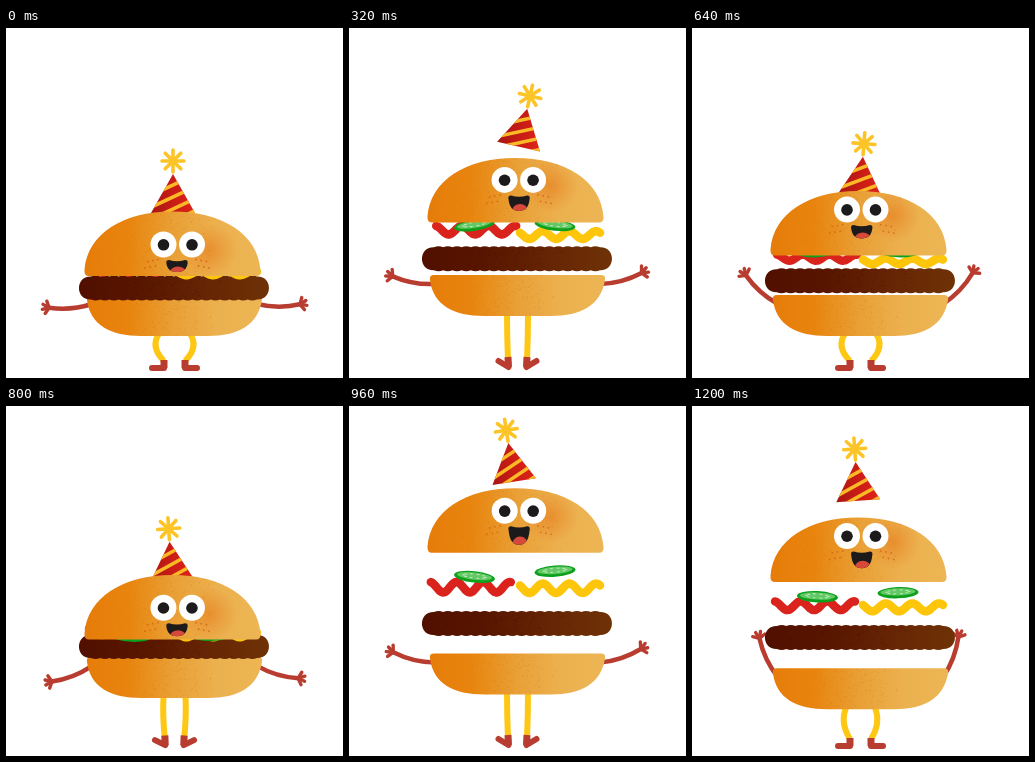
Write an HTML page with a canvas that moves like this. It is 337x350 px and loops after 1280 ms.

```html
<!DOCTYPE html>
<html lang="en">
<head>
<meta charset="utf-8">
<title>Jumping party burger</title>
<style>
html, body { margin: 0; width: 100%; height: 100%; overflow: hidden; background: #fff; }
canvas { display: block; width: 337px; height: 350px; }
</style>
</head>
<body>
<canvas id="stage"></canvas>
<script>
const W = 337, H = 350, STEP = 80, COUNT = 16;
const canvas = document.getElementById('stage');
const c = canvas.getContext('2d');
const scale = window.devicePixelRatio || 1;
canvas.width = Math.round(W * scale);
canvas.height = Math.round(H * scale);

const RED = '#b83d30', YELLOW = '#fdc714', DARK = '#1d1a1b';
const BUN = ramp(79, 256, '#e67c09', '#e8850f', '#e9a036', '#ecb14f', '#edb554');
const MEAT = ramp(73, 263, '#510f00', '#581600', '#662504', '#6f3206');

// Two hops per loop, a small and a big one, as [take-off, landing] steps.
const beat = {
  base:  [[0, 8], [8.5, 15.3]],
  patty: [[.7, 8.5], [9.4, 16]],
  sauce: [[1.1, 8.6], [9.7, 16]],
  bun:   [[.9, 8.8], [9.85, 16]],
  hat:   [[1.5, 8.45], [9.9, 16.3]]
};

// How far a layer is off the ground; the big hop hangs longer at the top.
function lift(i, hops, small, big) {
  const arc = ([from, to], power) => {
    const u = (i - from) / (to - from);
    return u > 0 && u < 1 ? 1 - Math.abs(2 * u - 1) ** power : 0;
  };
  return small * arc(hops[0], 2) + big * arc(hops[1], 3);
}

function smooth(a, b, x) {
  const u = Math.min(1, Math.max(0, (x - a) / (b - a)));
  return u * u * (3 - 2 * u);
}

function poseAt(i) {
  const big = i >= 9;
  const u = big ? (i - 9) / 7 : i / 9;
  const sway = (big ? -9 : 13) * Math.sin(Math.PI * u);
  const swing = Math.sin(2 * Math.PI * (.1 + .85 * u));
  const look = smooth(.1, .6, u);
  const bunLift = lift(i, beat.bun, 56, 104);
  const sauceLift = lift(i, beat.sauce, 42, 62);
  const base = 267 - lift(i, beat.base, 20, 19.5);
  return {
    sway, base,
    bun: 248 - bunLift,
    patty: 260 - lift(i, beat.patty, 30, 43),
    ketchup: 242 - sauceLift,
    mustard: 245 - lift(i, beat.sauce, 40, 64),
    pickleL: 240 - lift(i, beat.bun, 45, 71),
    pickleR: 240 - lift(i, beat.bun, 45, 77),
    hat: 185 - lift(i, beat.hat, 72, 114),
    wave: 2.5 + sauceLift * .045,
    face: 32.5 - 14.5 * look,
    faceX: -2.5 * look,
    mouth: 12 + bunLift * .065,
    arm: (big ? 24 - 46 * swing : 15 - 34 * swing) * Math.PI / 180,
    crouch: Math.max(0, base - 249)
  };
}

function ramp(x0, x1, ...colors) {
  const g = c.createLinearGradient(x0, 0, x1, 0);
  colors.forEach((color, i) => g.addColorStop(i / (colors.length - 1), color));
  return g;
}

function line(pts, width, color, cap = 'round') {
  c.beginPath();
  pts.forEach(p => c.lineTo(p[0], p[1]));
  c.lineWidth = width;
  c.strokeStyle = color;
  c.lineCap = cap;
  c.lineJoin = 'round';
  c.stroke();
}

function bend(a, m, b, width, color, cap = 'round') {
  c.beginPath();
  c.moveTo(...a);
  c.quadraticCurveTo(...m, ...b);
  c.lineWidth = width;
  c.strokeStyle = color;
  c.lineCap = cap;
  c.stroke();
}

function oval(x, y, rx, ry, color) {
  c.beginPath();
  c.ellipse(x, y, rx, ry, 0, 0, 7);
  c.fillStyle = color;
  c.fill();
}

function grain(seed, n, x, y, w, h, color) {
  let s = seed;
  const rnd = () => (s = s * 16807 % 2147483647) / 2147483647;
  c.fillStyle = color;
  for (let i = 0; i < n; i++) c.fillRect(x + (rnd() + rnd()) / 2 * w, y + rnd() * h, .9, .9);
}

function mirrored(draw) {
  c.save();
  c.translate(W, 0);
  c.scale(-1, 1);
  draw();
  c.restore();
}

function leg(p) {
  const flat = Math.min(1, p.crouch / 12);
  const ankle = 159 - flat, hipY = p.base + 38;
  bend([158 - p.crouch * .25, hipY], [158 - p.crouch * .8, (hipY + 332) / 2], [ankle, 333], 6, YELLOW, 'butt');
  const heel = [159.5 - 1.5 * flat, 339 + flat];
  line([[ankle, 329 + 3 * flat], heel], 7, RED, 'butt');
  line([heel, [149.5 - 3.5 * flat, 333 + 7 * flat]], 6, RED);
}

function arm(y, angle) {
  const x = 86, reach = 43;
  const hx = x - reach * Math.cos(angle), hy = y - reach * Math.sin(angle);
  const mx = (x + hx) / 2 - 5 * Math.sin(angle), my = (y + hy) / 2 + 5 * Math.cos(angle);
  bend([x, y], [mx, my], [hx, hy], 4.5, RED);
  const a = Math.atan2(hy - my, hx - mx);
  for (let f = -1.1; f < 1.2; f += .73) {
    line([[hx, hy], [hx + 7 * Math.cos(a + f), hy + 7 * Math.sin(a + f)]], 3.4, RED);
  }
}

function lowerBun(y) {
  c.save();
  c.beginPath();
  c.moveTo(85, y);
  c.lineTo(252, y);
  c.quadraticCurveTo(257, y, 256, y + 5);
  c.bezierCurveTo(252, y + 30, 232, y + 41, 202, y + 41);
  c.lineTo(135, y + 41);
  c.bezierCurveTo(105, y + 41, 84, y + 30, 81, y + 5);
  c.quadraticCurveTo(80, y, 85, y);
  c.fillStyle = BUN;
  c.fill();
  c.clip();
  grain(71, 150, 105, y, 110, 41, 'rgba(200,110,15,.3)');
  c.restore();
}

function patty(y) {
  const n = 18, x0 = 85, step = 166 / n;
  c.save();
  c.beginPath();
  c.moveTo(x0, y - 11.5);
  for (let i = 0; i < n; i++) c.quadraticCurveTo(x0 + (i + .5) * step, y - 13.5, x0 + (i + 1) * step, y - 11.5);
  c.bezierCurveTo(267, y - 12, 267, y + 12, 251, y + 11.5);
  for (let i = n - 1; i >= 0; i--) c.quadraticCurveTo(x0 + (i + .5) * step, y + 13.5, x0 + i * step, y + 11.5);
  c.bezierCurveTo(69, y + 12, 69, y - 12, x0, y - 11.5);
  c.fillStyle = MEAT;
  c.fill();
  c.clip();
  grain(29, 110, 90, y - 12, 150, 24, 'rgba(60,14,0,.4)');
  c.restore();
}

function sauce(x, y, amp, shift, color) {
  const pts = [];
  for (let u = 0; u <= 1; u += 1 / 64) {
    pts.push([x + u * 80, y - amp * Math.sin(u * 6 * Math.PI + shift)]);
  }
  line(pts, 8.5, color);
}

function pickle(x, y, deg) {
  c.save();
  c.translate(x, y);
  c.rotate(deg * Math.PI / 180);
  oval(0, 0, 20.5, 5.7, '#0da01d');
  oval(0, -.8, 17.5, 3.6, '#62c966');
  for (let a = 0; a < 6.2; a += Math.PI / 5) {
    oval(11 * Math.cos(a), -.8 + 2 * Math.sin(a), 1.7, .6, '#b9e8ae');
  }
  c.restore();
}

function hat(p) {
  c.save();
  c.translate(167 + p.sway * .2, p.hat);
  c.rotate(p.sway * Math.PI / 180);
  c.save();
  c.beginPath();
  c.moveTo(-22, 0);
  c.lineTo(0, -39);
  c.lineTo(22, 0);
  c.closePath();
  c.fillStyle = ramp(-22, 22, '#a81613', '#c91c16', '#df2419');
  c.fill();
  c.clip();
  for (let y = -28; y < 10; y += 12) line([[-30, y + 14], [30, y - 14]], 3.5, '#fbb926');
  c.restore();
  for (let a = 0; a < 3; a += Math.PI / 4) {
    const dx = 11 * Math.cos(a), dy = 11 * Math.sin(a);
    line([[-dx, -52 - dy], [dx, -52 + dy]], 3.6, '#fcc426');
  }
  c.restore();
}

function blush(x, y, r) {
  const g = c.createRadialGradient(x, y, 0, x, y, r);
  g.addColorStop(0, 'rgba(229,112,20,.5)');
  g.addColorStop(1, 'rgba(229,112,20,0)');
  c.fillStyle = g;
  c.fillRect(x - r, y - r, 2 * r, 2 * r);
}

function freckles(x, y) {
  for (let k = 0; k < 6; k++) {
    const row = k % 2, dx = 19 + 2.6 * k, dy = row * 6 + k * .5;
    for (const side of [-1, 1]) oval(x + side * dx, y + dy, .9, .9, 'rgba(211,91,22,.75)');
  }
}

function mouth(x, y, h) {
  c.save();
  c.beginPath();
  c.moveTo(x - 8, y);
  c.quadraticCurveTo(x, y + 2.5, x + 8, y);
  c.quadraticCurveTo(x + 11.5, y, x + 10.5, y + 4);
  c.bezierCurveTo(x + 9.5, y + h * .8, x + 6, y + h, x, y + h);
  c.bezierCurveTo(x - 6, y + h, x - 9.5, y + h * .8, x - 10.5, y + 4);
  c.quadraticCurveTo(x - 11.5, y, x - 8, y);
  c.fillStyle = DARK;
  c.fill();
  c.clip();
  oval(x + 1, y + h, 8, h * .45, '#d5483a');
  c.restore();
}

function topBun(p) {
  const y = p.bun, eyeY = y - 64 + p.face, mouthX = 171 + p.faceX * .5;
  c.save();
  c.beginPath();
  c.moveTo(83, y);
  c.quadraticCurveTo(78, y, 78.5, y - 6);
  c.bezierCurveTo(81, y - 42, 117, y - 64.5, 166, y - 64.5);
  c.bezierCurveTo(216, y - 64.5, 252, y - 42, 254.5, y - 6);
  c.quadraticCurveTo(255, y, 250, y);
  c.closePath();
  c.fillStyle = BUN;
  c.fill();
  c.clip();
  grain(43, 210, 95, y - 64, 125, 64, 'rgba(202,112,18,.3)');
  blush(204 + p.faceX, eyeY + 6, 27);
  freckles(mouthX, eyeY + 15);
  c.restore();
  for (const x of [157.5, 186]) {
    oval(x + p.faceX, eyeY, 13, 13, '#fff');
    oval(x + p.faceX, eyeY + .3, 5.8, 5.8, DARK);
  }
  mouth(mouthX, eyeY + 15.5, p.mouth);
}

function draw(p) {
  c.setTransform(scale, 0, 0, scale, 0, 0);
  c.fillStyle = '#fff';
  c.fillRect(0, 0, W, H);
  leg(p);
  mirrored(() => leg(p));
  arm(p.base + 9, p.arm);
  mirrored(() => arm(p.base + 9, p.arm + .08));
  lowerBun(p.base);
  patty(p.patty);
  sauce(84 + p.sway * .25, p.ketchup, p.wave, 1.8, '#d9231c');
  sauce(171, p.mustard, p.wave * .9, 2.5, '#fec60a');
  pickle(125.5, p.pickleL, -p.sway * .7);
  pickle(206, p.pickleR, p.sway * .5);
  hat(p);
  topBun(p);
}

const start = performance.now();
let last = -1;
function tick(now) {
  const i = Math.floor(Math.max(0, now - start) / STEP) % COUNT;
  if (i !== last) draw(poseAt(last = i));
  requestAnimationFrame(tick);
}
tick(start);
</script>
</body>
</html>
```
